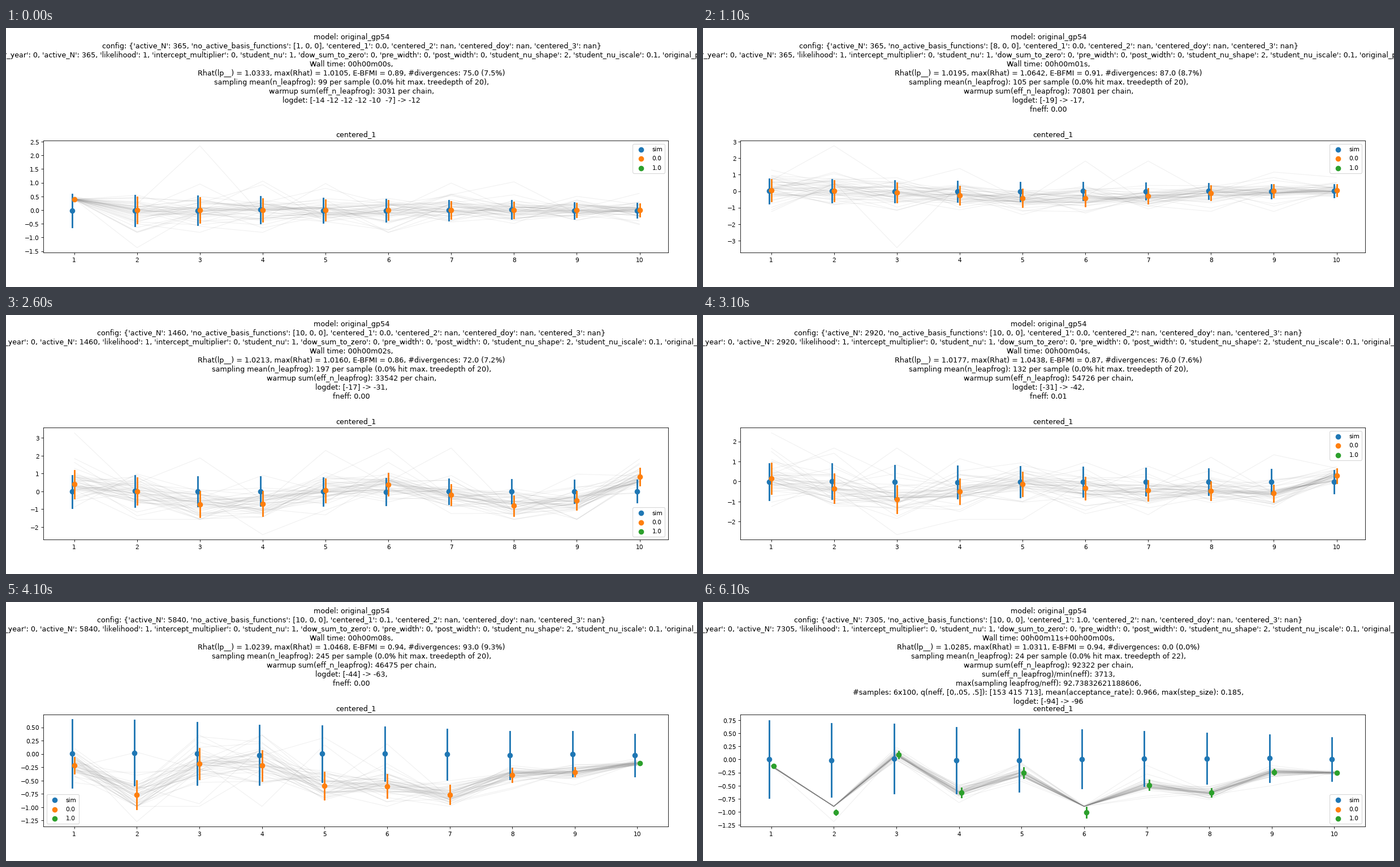
Recreate the animation shown at these times as a matplotlib script. Size 1222 by 458 pixels, loop 6600 ms.

```python
import numpy as np
import matplotlib.pyplot as plt
from matplotlib.animation import FuncAnimation
from matplotlib.collections import LineCollection

W, H, DPI = 16, 6, 76.39
PX, PY = W * DPI, H * DPI
STAGE_H = 458
DODGE = 0.0375
BAR = 2.7
DOT = 2 * np.pi * BAR ** 2
PITCH = 16
LAST = 13
COLS = np.arange(1, 11)

plt.rcParams.update({"font.family": "DejaVu Sans", "text.hinting": "default"})

# Steps with known values; the others are interpolated.
KEYS = [0, 3, 6, 8, 9, 11, 13]
Y_LOW = [-1.557, -3.74, -2.71, -3.09, -1.368, -1.333, -1.282]
Y_HIGH = [2.536, 3.07, 3.57, 1.8, .737, .848, .853]
SIM_FIRST = [.6, .73, .9, .92, .635, .75, .73]
SIM_LAST = [.25, .37, .61, .54, .395, .42, .41]
STATS = {
    "wall": [0, 1, 2, 5, 8, 10, 11],
    "rhat": [1.0333, 1.0195, 1.0213, 1.0142, 1.0239, 1.0030, 1.0285],
    "rmax": [1.0105, 1.0642, 1.0160, 1.0717, 1.0468, 1.0085, 1.0311],
    "bfmi": [.89, .91, .86, .88, .94, .98, .94],
    "div": [75, 87, 72, 81, 93, 100, 0],
    "leap": [99, 105, 197, 66, 245, 95, 24],
    "warm": [3031, 70801, 33542, 75910, 46475, 73784, 92322],
    "fneff": [0, 0, 0, .01, 0, 0, 0],
}
LOGDET = [-12, -13, -19, -17, -16, -17, -31, -42, -44, -63, -84, -94, -94, -96]
SIZES = [365] * 5 + [730, 1460] + [2920] * 2 + [5840] * 2 + [7305] * 3
CENTERED = [0.0] * 8 + [0.1] * 2 + [1.0] * 4
LEGEND = (["upper right"] * 6 + ["lower right", "upper right", "lower right"]
          + ["lower left"] * 2 + ["lower right", "lower left", "lower right"])


def wave(mid, amp, start, period, edge):
    """Cosine over the columns, lifted at the last one."""
    return (mid + amp * np.cos(2 * np.pi * (COLS - start) / period)
            + edge * np.exp(3 * (COLS - 10)))


def ramp(first, last):
    return np.linspace(first, last, 10)


def arch(height, power):
    return height * np.sin(np.pi * ((COLS - 0.7) / 10) ** power)


CONVERGED = np.array([-.12, -1.01, .09, -.63, -.25, -1.01, -.49, -.635, -.24, -.255])
MEANS = [
    np.where(COLS == 1, .4, 0),
    .07 - .52 * np.exp(-((COLS - 5.6) / 2.3) ** 2),
    wave(-.22, .62, 1.1, 4.75, .6),
    wave(-.6, .5, 1, 3.5, .8),
    np.array([-.22, -.77, -.185, -.22, -.595, -.605, -.765, -.4, -.34, -.175]),
    CONVERGED,
    CONVERGED,
]
SPREADS = [
    np.where(COLS == 1, .03, ramp(.51, .22)),
    ramp(.66, .35),
    ramp(.78, .48),
    ramp(.75, .25),
    arch(.29, .5),
    arch(.1, 1),
    arch(.1, 1),
]


def at(k, values):
    """Value of step k, interpolated between the key steps."""
    values = np.array(values)
    pos = np.interp(k, KEYS, range(len(KEYS)))
    lo, t = int(pos), pos % 1
    hi = min(lo + 1, len(KEYS) - 1)
    return (1 - t) * values[lo] + t * values[hi]


def header(k):
    s = {name: at(k, values) for name, values in STATS.items()}
    n = SIZES[k]
    final = k == LAST
    extra = "+00h00m00s" if final else ""
    lines = [
        "model: original_gp54",
        f"config: {{'active_N': {n}, 'no_active_basis_functions': "
        f"[{min(2 ** k, 10)}, 0, 0], 'centered_1': {CENTERED[k]}, "
        "'centered_2': nan, 'centered_doy': nan, 'centered_3': nan}",
        f"r_year': 0, 'active_N': {n}, 'likelihood': 1, 'intercept_multiplier': 0, "
        "'student_nu': 1, 'dow_sum_to_zero': 0, 'pre_width': 0, 'post_width': 0, "
        "'student_nu_shape': 2, 'student_nu_iscale': 0.1, 'original_p",
        f"Wall time: 00h00m{s['wall']:02.0f}s{extra},",
        f"Rhat(lp__) = {s['rhat']:.4f}, max(Rhat) = {s['rmax']:.4f}, "
        f"E-BFMI = {s['bfmi']:.2f}, "
        f"#divergences: {round(s['div']):.1f} ({round(s['div']) / 10:.1f}%)",
        f"sampling mean(n_leapfrog): {s['leap']:.0f} per sample "
        f"(0.0% hit max. treedepth of {22 if final else 20}),",
        f"warmup sum(eff_n_leapfrog): {s['warm']:.0f} per chain,",
    ]
    if k == 0:
        return lines + [f"logdet: [-14 -12 -12 -12 -10  -7] -> {LOGDET[0]}"]
    logdet = f"logdet: [{LOGDET[k - 1]}] -> {LOGDET[k]}"
    if final:
        return lines + [
            "sum(eff_n_leapfrog)/min(neff): 3713,",
            "max(sampling leapfrog/neff): 92.73832621188606,",
            "#samples: 6x100, q(neff, [0,.05, .5]): [153 415 713], "
            "mean(acceptance_rate): 0.966, max(step_size): 0.185,",
            logdet,
        ]
    return lines + [logdet + ",", f"fneff: {s['fneff']:.2f}"]


def draws(rng, mean, sd, low, high, sim_top, count=45):
    """Heavy-tailed sample paths whose extremes reach the axis margins."""
    pad = (high - low) / 22
    y = mean + sd * rng.standard_t(3, (count, 10)) / 1.73
    y = np.clip(y, low + 4 * pad, high - 4 * pad)
    y.flat[y.argmin()] = low + pad
    if sim_top < high - 2 * pad:
        y.flat[y.argmax()] = high - pad
    return y


def points(x, mean, sd, color, label):
    ax.vlines(x, mean - sd, mean + sd, color=color, lw=BAR,
              capstyle="projecting", zorder=2)
    ax.scatter(x, mean, s=DOT, color=color, linewidth=0.85 * BAR,
               label=label, zorder=2)


def draw_step(k):
    low, high = at(k, Y_LOW), at(k, Y_HIGH)
    mean, sd = at(k, MEANS), at(k, SPREADS)
    sim_sd = ramp(at(k, SIM_FIRST), at(k, SIM_LAST))
    rng = np.random.default_rng(40 + k)
    sim = rng.normal(0, .015, 10)
    green = (COLS == 10) & (CENTERED[k] > 0) | (CENTERED[k] == 1)

    ax.clear()
    paths = draws(rng, mean, sd, low, high, sim_sd[0])
    ax.add_collection(LineCollection([np.column_stack([COLS, y]) for y in paths],
                                     colors="gray", alpha=0.12, linewidths=1, zorder=1))
    points(COLS - DODGE, sim, sim_sd, "tab:blue", "sim")
    points(COLS[~green], mean[~green], sd[~green], "tab:orange", "0.0")
    points(COLS[green] + DODGE, mean[green], sd[green], "tab:green", "1.0")

    left, right = 1 - DODGE, 10 + DODGE * green.any()
    pad = 0.05 * (right - left)
    ax.set_xlim(left - pad, right + pad)
    ax.set_ylim(low, high)
    ax.set_xticks(COLS)
    ax.set_title("centered_1")
    ax.legend(loc=LEGEND[k])

    for text in list(fig.texts):
        text.remove()
    for row, line in enumerate(header(k)):
        fig.text(0.5, up(20 + PITCH * row), line, fontsize=12, ha="center")


def up(y):
    """Pixels from the top as a figure fraction."""
    return (STAGE_H - y) / PY


fig = plt.figure(figsize=(W, H), dpi=DPI)
ax = fig.add_axes([66.3 / PX, up(397.4), 1104.5 / PX, up(199.2) - up(397.4)])
shown = {"step": None}


def update(i):
    # the first step lasts one tick, all others five
    k = (i + 4) // 5
    if k != shown["step"]:
        draw_step(k)
        shown["step"] = k
    return []


anim = FuncAnimation(fig, update, frames=66, interval=100, repeat=True,
                     repeat_delay=0, blit=False)
plt.show()
```
